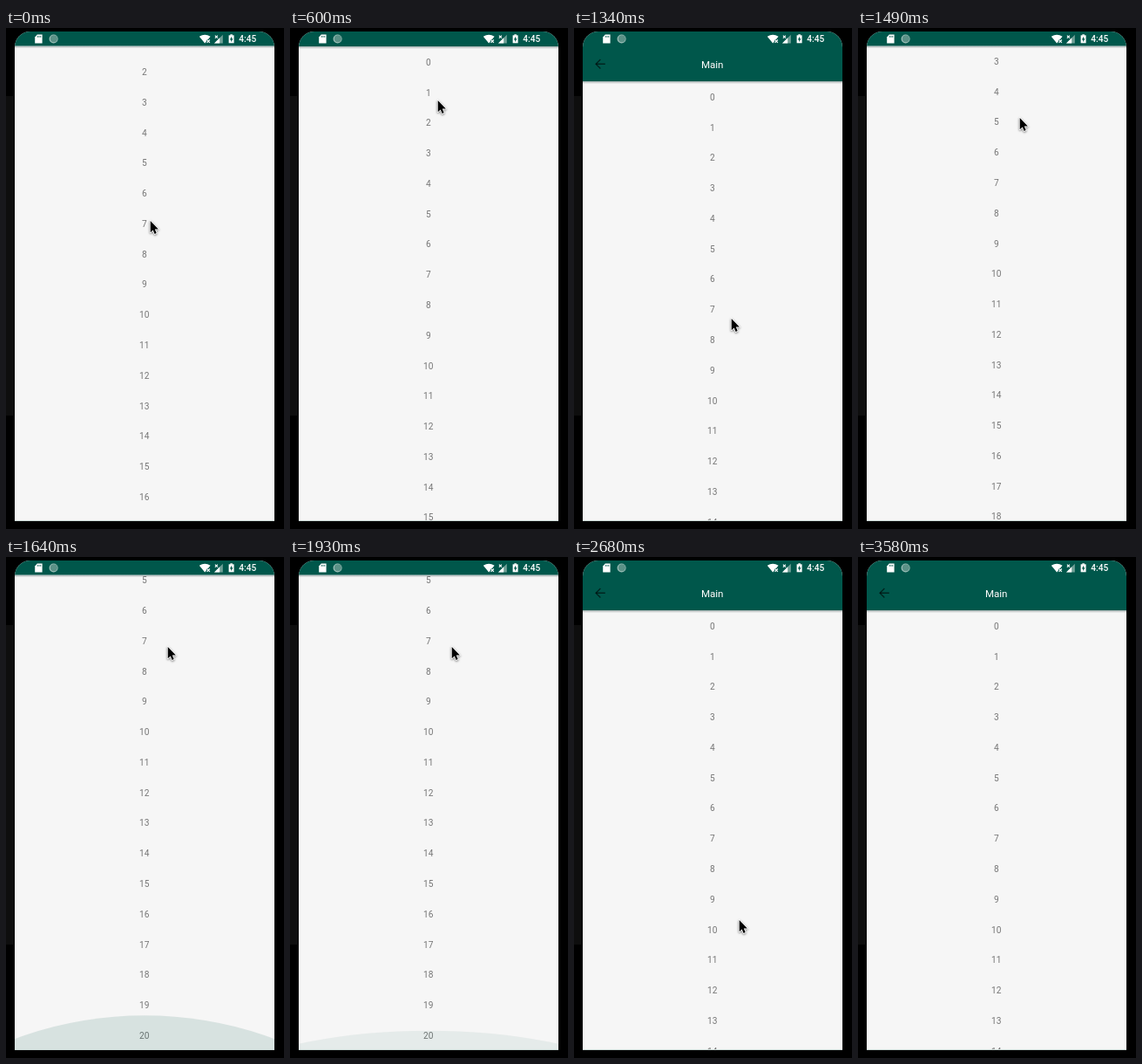
An HTML page with a canvas for the animation above (4400 ms loop, 319 px wide and 574 px high).

```html
<!DOCTYPE html>
<html lang="en">
<head>
<meta charset="utf-8">
<title>Collapsing toolbar</title>
<style>
  html, body { margin: 0; width: 100%; height: 100%; overflow: hidden; background: #000; }
  canvas { display: block; width: 319px; height: 574px; }
</style>
</head>
<body>
<canvas id="stage" width="319" height="574"></canvas>
<script>
const ctx = document.getElementById('stage').getContext('2d');
const LOOP = 4400, FRAME = 148.8;
const DP = 298 / 411.43;               // pixels per dp
const LEFT = 10, RIGHT = 308, TOP = 4, BOTTOM = 565, MID = 159;
const WIDTH = RIGHT - LEFT;
const STATUS_END = 20.5, FIRST_ROW = 79.3;
const BAR = 56 * DP, ROW = 48 * DP;
const ROWS = 21, END = 226.4;          // END: furthest scroll
const GREEN = '#00574b';
const FONT = 'Roboto, "Noto Sans", sans-serif';

// Ease out from one value to another; higher power starts faster.
function ease(from, to, n, start, frames, power = 1) {
  const p = Math.min(1, Math.max(0, (n - start) / frames));
  return to + (from - to) * (1 - p) ** power;
}

function scrollAt(n) {
  let s = ease(98.3, 40, n, 1, 3, 4);  // fling to the top of the list
  s = ease(s, 0, n, 4, 1);             // pull the toolbar out
  s = ease(s, END, n, 9, 2, 1.48);     // fling to the end
  return ease(s, 0, n, 16, 2, 2.1);    // and back
}

function cursorAt(n) {
  const move = (x, y, ...timing) => {
    pos.x = ease(pos.x, x, n, ...timing);
    pos.y = ease(pos.y, y, n, ...timing);
  };
  const pos = { x: 166, y: 221 };
  move(170, 83, 0, 2, 0.03);
  move(181, 341, 4, 2, 2.4);
  move(181, 333, 8, 1);
  move(186, 103, 9, 1);
  move(190, 416, 15, 2, 0.76);
  return pos;
}

function glowAt(n) {
  return n < 11 ? 0 : ease(0.83, 0, n, 12, 4, 2);
}

function fillRect(color, x, y, w, h) {
  ctx.fillStyle = color;
  ctx.fillRect(x, y, w, h);
}

function poly(points, color) {
  ctx.beginPath();
  points.forEach(([x, y]) => ctx.lineTo(x, y));
  ctx.closePath();
  ctx.fillStyle = color;
  ctx.fill();
}

function disc(x, y, r, color) {
  ctx.beginPath();
  ctx.arc(x, y, r, 0, 2 * Math.PI);
  ctx.fillStyle = color;
  ctx.fill();
}

function label(text, x, y, sp, color, weight = 400) {
  ctx.font = `${weight} ${sp * DP}px ${FONT}`;
  ctx.textAlign = 'center';
  ctx.fillStyle = color;
  ctx.fillText(text, x, y);
}

function line(color, width, ...points) {
  ctx.beginPath();
  points.forEach(([x, y]) => ctx.lineTo(x, y));
  ctx.strokeStyle = color;
  ctx.lineWidth = width;
  ctx.stroke();
}

function cross(x, y, r) {
  for (const [color, w] of [[GREEN, 2.4], ['#fff', 1.1]]) {
    line(color, w, [x - r, y - r], [x + r, y + r]);
    line(color, w, [x - r, y + r], [x + r, y - r]);
  }
}

function drawList(scroll) {
  for (let i = 0; i < ROWS; i++) {
    label(i, MID - 0.2, FIRST_ROW + i * ROW - scroll + 3.6, 14, '#757575');
  }
}

function drawGlow(strength) {
  if (!strength) return;
  const r = WIDTH * 1.2;
  const height = r * (1 - Math.cos(Math.PI / 6)) * strength;
  ctx.fillStyle = `rgba(0,87,75,${0.152 * strength})`;
  ctx.beginPath();
  ctx.ellipse(MID, BOTTOM - height + r * strength, r, r * strength, 0, 0, 2 * Math.PI);
  ctx.fill();
}

function drawToolbar(scroll) {
  const shift = Math.min(scroll, BAR);
  const bottom = STATUS_END + BAR - shift;
  const shade = ctx.createLinearGradient(0, bottom, 0, bottom + 3);
  shade.addColorStop(0, 'rgba(0,25,30,0.32)');
  shade.addColorStop(1, 'rgba(0,25,30,0)');
  fillRect(shade, LEFT, bottom, WIDTH, 3);
  fillRect(GREEN, LEFT, TOP, WIDTH, bottom - TOP);
  if (bottom < 30) return;

  const y = 41.2 - shift;
  const dark = 'rgba(0,0,0,0.58)';
  label('Main', MID - 0.3, y + 4.3, 16, '#fff');
  line(dark, 1.4, [25.2, y], [35.8, y]);
  line(dark, 1.4, [30.4, y - 5.3], [25.1, y], [30.4, y + 5.3]);
}

function drawStatus() {
  // memory card
  poly([[35.8, 7.6], [41.6, 7.6], [41.6, 17.4], [33.2, 17.4], [33.2, 10.4]], '#fff');
  for (let x = 35.8; x < 40; x += 1.8) fillRect(GREEN, x, 9, 0.8, 1.8);

  // progress disc
  disc(54.6, 12.5, 5, '#9dbfb8');
  disc(54.9, 12.2, 4, '#5b9187');

  // wifi
  ctx.beginPath();
  ctx.moveTo(228.2, 17.4);
  ctx.lineTo(221.8, 9.8);
  ctx.quadraticCurveTo(228.2, 5.8, 234.6, 9.8);
  ctx.closePath();
  ctx.fillStyle = '#fff';
  ctx.fill();
  cross(232.2, 15.2, 1.7);

  // signal
  poly([[248.8, 7.7], [248.8, 17.4], [239, 17.4]], '#6f9f96');
  poly([[245.2, 11.3], [245.2, 17.4], [239, 17.4]], '#fff');
  cross(241.4, 10.2, 1.5);

  // battery
  fillRect('#fff', 257.3, 7.3, 2.6, 1.4);
  fillRect('#fff', 255.6, 8.3, 6, 9);
  poly([[259.1, 9.4], [256.8, 13.4], [258.2, 13.4], [258.2, 16.2], [260.5, 12.2], [259.1, 12.2]], GREEN);

  label('4:45', 277.3, 16.1, 14, '#fff', 500);
}

function drawCursor({ x, y }) {
  const arrow = [[0, 0], [0, 13.2], [3, 10.4], [4.9, 15], [7, 14.1], [5.1, 9.6], [9.2, 9.6]];
  const points = arrow.map(([dx, dy]) => [x - 0.3 + dx, y + dy]);
  ctx.save();
  ctx.shadowColor = 'rgba(0,0,0,0.4)';
  ctx.shadowBlur = 2.5;
  ctx.shadowOffsetY = 1;
  ctx.lineJoin = 'round';
  ctx.strokeStyle = '#fff';
  ctx.lineWidth = 1.8;
  poly(points, '#fff');
  ctx.stroke();
  ctx.restore();
  poly(points, '#000');
}

function draw(time) {
  const n = Math.floor((time + 6) / FRAME);
  const scroll = scrollAt(n);
  fillRect('#000', 0, 0, 319, 574);
  fillRect('#0e0e0e', 0, 78, 9, 366);
  ctx.save();
  ctx.beginPath();
  ctx.roundRect(LEFT, TOP, WIDTH, BOTTOM - TOP, [18, 18, 0, 0]);
  ctx.clip();
  fillRect('#f6f6f6', LEFT, TOP, WIDTH, BOTTOM - TOP);
  drawList(scroll);
  drawGlow(glowAt(n));
  drawToolbar(scroll);
  drawStatus();
  fillRect('#cbd9d6', LEFT, BOTTOM - 1, WIDTH, 1);
  ctx.restore();
  if (n < 24) drawCursor(cursorAt(n));
}

const start = performance.now();
function tick() {
  draw((performance.now() - start) % LOOP);
  requestAnimationFrame(tick);
}
tick();
</script>
</body>
</html>
```
